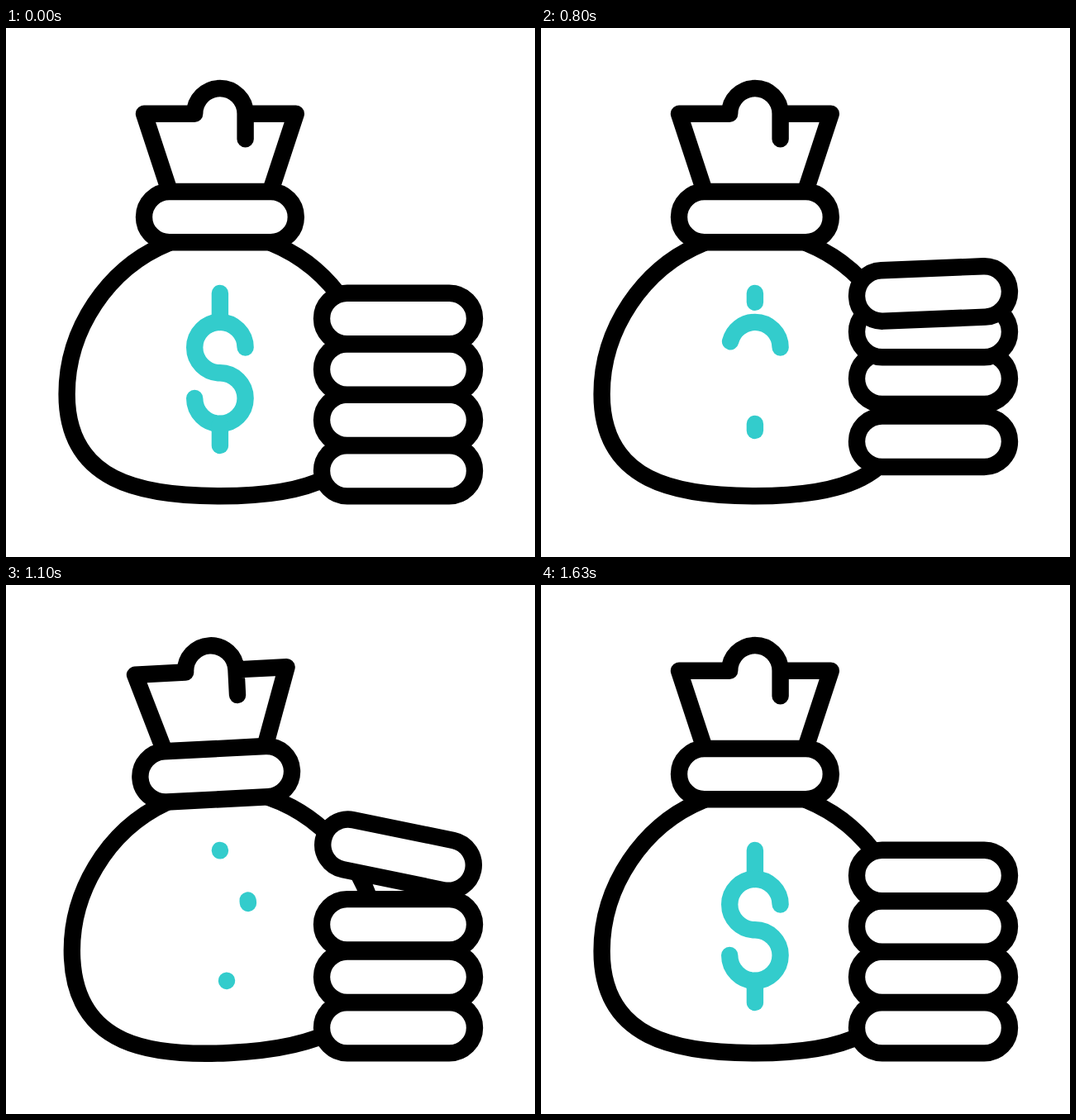
These frames come from a looping animation (640 px wide and 640 px high, 2.5 s). An HTML page:

```html
<!DOCTYPE html>
<html lang="en">
<head>
<meta charset="utf-8">
<title>Money bag</title>
<style>
  html, body { margin: 0; height: 100%; overflow: hidden; background: #fff; }
  svg { display: block; width: 100vw; height: 100vh; }
  svg * { stroke-width: 20.4; stroke-linecap: round; stroke-linejoin: round; }
  .ink { fill: #fff; stroke: #000; }
  #dollar { fill: none; stroke: #3cc; }
</style>
</head>
<body>
<svg viewBox="0 0 640 640">
  <g id="bag">
    <g class="ink">
      <path d="M197 260C123 290 73.6 365 73.6 443C73.6 549 163 566.3 258.9 566.3S444.2 549 444.2 443C444.2 365 394.8 290 320.8 260"/>
      <path d="M198 198L167 103.7H228.2a30.7 30.7 0 0 1 61.4 0H350.8L319.8 198M289.6 103.7V134.4"/>
      <rect x="167" y="198" width="183.8" height="61.3" rx="30.7"/>
    </g>
    <g id="dollar">
      <path pathLength="1" d="M258.9 320.9V356"/>
      <path pathLength="1" d="M289.6 386.6a30.7 30.7 0 1 0-30.7 30.7a30.7 30.7 0 1 1-30.7 30.7"/>
      <path pathLength="1" d="M258.9 478.9V505"/>
    </g>
  </g>
  <g id="coins" class="ink"></g>
</svg>
<script>
const LOOP = 2500, FPS = 30, START = 15;
const bag = document.getElementById('bag');
const dollar = document.getElementById('dollar');
const coinBox = document.getElementById('coins');

// Steps at which each coin takes off and lands, from the top coin down.
const hops = [[6.15, 23], [4.7, 18.3], [2.65, 16], [0.6, 13.93]];

// Upper coins cover the lower ones, so each new one goes underneath.
const coins = hops.map(([lift, land], i) => {
  const el = document.createElementNS('http://www.w3.org/2000/svg', 'rect');
  const box = { x: -92.5, y: -30.7, width: 185, height: 61.4, rx: 30.7 };
  for (const name in box) el.setAttribute(name, box[name]);
  coinBox.prepend(el);
  return { el, y: 351.5 + 61.4 * i, hop: [[lift, 0], [lift + 5.4, -56.9], [land, 0]] };
});

const trim = [[0, 1], [13, 0], [17.8, 0], [34, 1]];
const sway = [[12.8, 0], [19.8, -3.95], [26.8, 3.95], [33.8, 0]];
const tilt = [[8, 0], [13, -11.6], [18, 11.6], [23, 0]];

// Linear interpolation through [step, value] keys, held at both ends.
function at(keys, s) {
  const n = keys.findIndex(key => key[0] > s);
  if (n === 0) return keys[0][1];
  if (n < 0) return keys[keys.length - 1][1];
  const [s0, v0] = keys[n - 1], [s1, v1] = keys[n];
  return v0 + (v1 - v0) * (s - s0) / (s1 - s0);
}

function draw(ms) {
  const s = Math.floor((ms % LOOP + 4) * FPS / 1000) - START;
  bag.setAttribute('transform', `rotate(${at(sway, s)} 258.9 320.6)`);

  const shown = at(trim, s);
  dollar.style.display = shown > 0 ? '' : 'none';
  dollar.style.strokeDasharray = shown < 1 ? `${shown} 2` : 'none';

  coins.forEach(({ el, y, hop }, i) => {
    const angle = i ? 0 : at(tilt, s);
    el.setAttribute('transform', `translate(474.5 ${y + at(hop, s)}) rotate(${angle})`);
  });
}

const begin = performance.now();
function tick() {
  draw(performance.now() - begin);
  requestAnimationFrame(tick);
}
tick();
</script>
</body>
</html>
```
